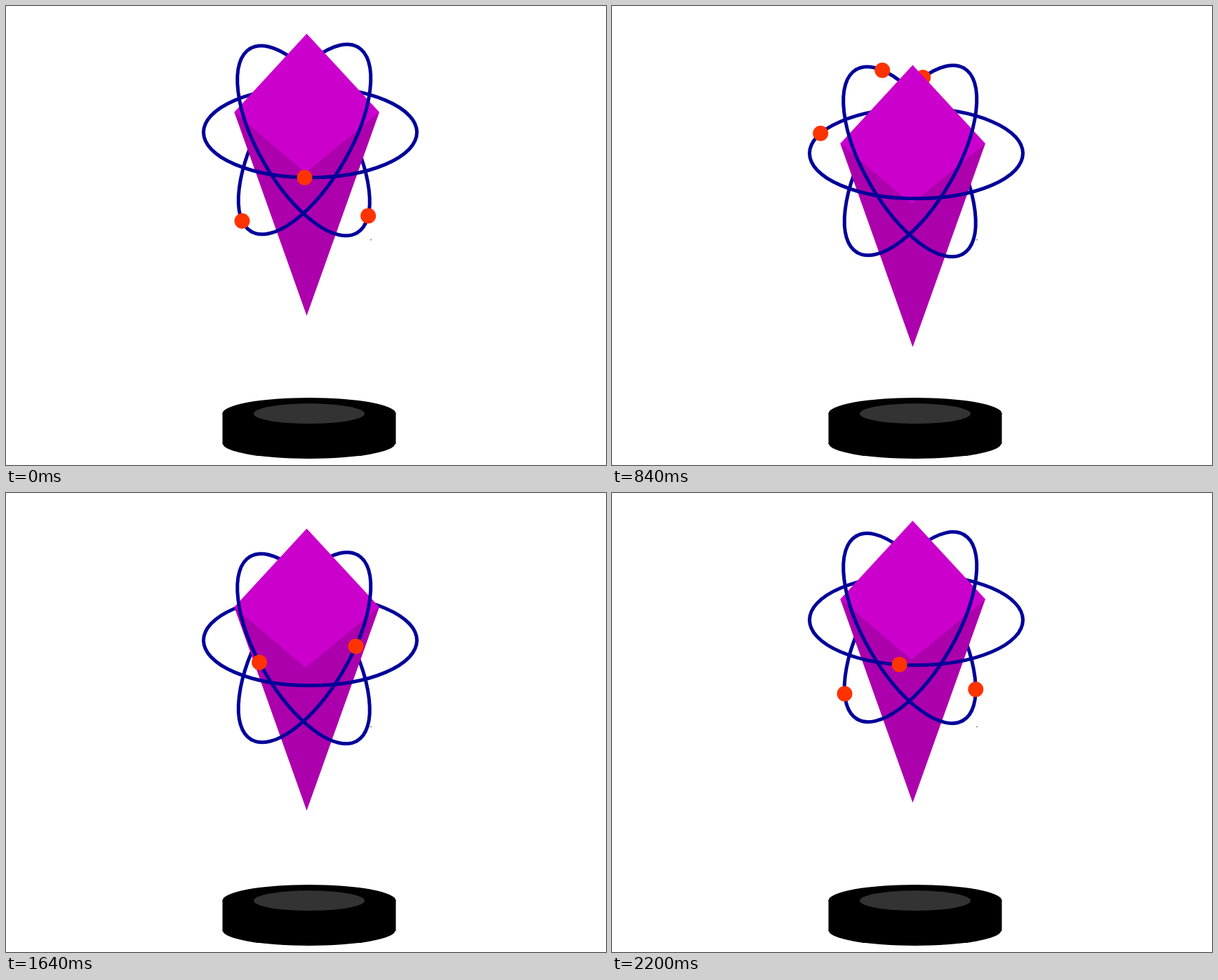
Recreate the animation shown at these times as an HTML page with a canvas. Size 855x655 px, loop 2.24 s.

```html
<!DOCTYPE html>
<html>
<head>
<meta charset="utf-8">
<style>
html, body { margin: 0; height: 100%; overflow: hidden; background: #fff; }
canvas { display: block; }
</style>
</head>
<body>
<canvas id="stage" width="855" height="655"></canvas>
<script>
const ctx = document.getElementById('stage').getContext('2d');
const LOOP = 2240, STEP = 40, RX = 152, RY = 64.5, RAD = Math.PI / 180;

// Soft ease from 0 to 1 between two times.
function ease(t, from, to) {
  const u = Math.min(1, Math.max(0, (t - from) / (to - from)));
  return .15 * u + .85 * (1 - Math.cos(Math.PI * u)) / 2;
}

// The crystal sinks, then rises and rests; the rings bob a little later.
const crystalY = t => 46 * (ease(t, 0, 920) - ease(t, 920, 1980));
function orbitY(t) {
  const a = 2 * Math.PI * (t - 120) / LOOP;
  return 21.15 - 22.4 * Math.cos(a) + .6 * Math.cos(2 * a);
}

// Balls circle twice per loop: degrees travelled at shared key times.
const TIMES = [0, 360, 600, 1080, 1400, 1840, LOOP];
const orbits = [
  { x: 433.5, y: 179.8, tilt: 0, from: 93, dir: -1, path: [0, 75, 158, 326, 396, 666, 720] },
  { x: 425.5, y: 189.8, tilt: -60, from: 197, dir: -1, path: [0, 85, 142, 342, 433, 528, 720] },
  { x: 424, y: 191.8, tilt: 60, from: -24, dir: 1, path: [0, 64, 130, 336, 421, 536, 720] }
];

// Monotone cubic through the key points, repeating smoothly.
function travelled(path, t) {
  const n = TIMES.length - 1;
  const slope = i => {
    i = (i + n) % n;
    return (path[i + 1] - path[i]) / (TIMES[i + 1] - TIMES[i]);
  };
  const tangent = i => 2 / (1 / slope(i - 1) + 1 / slope(i));
  const i = TIMES.findIndex(key => key > t) - 1;
  const h = TIMES[i + 1] - TIMES[i], u = (t - TIMES[i]) / h, w = 1 - u;
  return path[i] * w * w * (1 + 2 * u) + path[i + 1] * u * u * (3 - 2 * u)
    + h * u * w * (tangent(i) * w - tangent(i + 1) * u);
}

function polygon(color, ...points) {
  ctx.fillStyle = color;
  ctx.beginPath();
  points.forEach(p => ctx.lineTo(...p));
  ctx.fill();
}

function oval(color, x, y, rx, ry) {
  ctx.fillStyle = color;
  ctx.beginPath();
  ctx.ellipse(x, y, rx, ry, 0, 0, 7);
  ctx.fill();
}

function drawOrbits(t, front) {
  const dy = orbitY(t);
  ctx.strokeStyle = '#000099';
  ctx.lineWidth = 5;
  ctx.lineCap = 'round';
  for (const o of orbits) {
    ctx.beginPath();
    ctx.ellipse(o.x, o.y + dy, RX, RY, o.tilt * RAD, 0, Math.PI, !front);
    ctx.stroke();
  }
  for (const o of orbits) {
    const a = (o.from + o.dir * travelled(o.path, t)) * RAD;
    if (Math.sin(a) > 0 !== front) continue;
    const u = RX * Math.cos(a), v = RY * Math.sin(a);
    const c = Math.cos(o.tilt * RAD), s = Math.sin(o.tilt * RAD);
    oval('#ff3300', o.x + u * c - v * s, o.y + dy + u * s + v * c, 11, 11);
  }
}

function drawCrystal(y) {
  const left = [325.3, 151.5 + y], right = [532, 151.5 + y], middle = [427, 238 + y];
  polygon('#ac00ac', left, right, [428.5, 442 + y]);
  polygon('#cc00cc', left, [428.5, 39.5 + y], right, middle);
}

function drawBase() {
  oval('#000', 432, 581.5, 123.5, 22.5);
  oval('#000', 431.7, 624.3, 123, 21.7);
  ctx.fillRect(308.5, 581, 247, 44);
  oval('#333', 432, 581.7, 79, 14.4);
}

function draw(now) {
  const t = Math.floor(now % LOOP / STEP) * STEP;
  ctx.fillStyle = '#fff';
  ctx.fillRect(0, 0, 855, 655);
  oval('#777', 520, 333.5, 1, 1);
  drawBase();
  drawOrbits(t, false);
  drawCrystal(crystalY(t));
  drawOrbits(t, true);
}

const start = performance.now();
function tick() {
  draw(performance.now() - start);
  requestAnimationFrame(tick);
}
tick();
</script>
</body>
</html>
```
